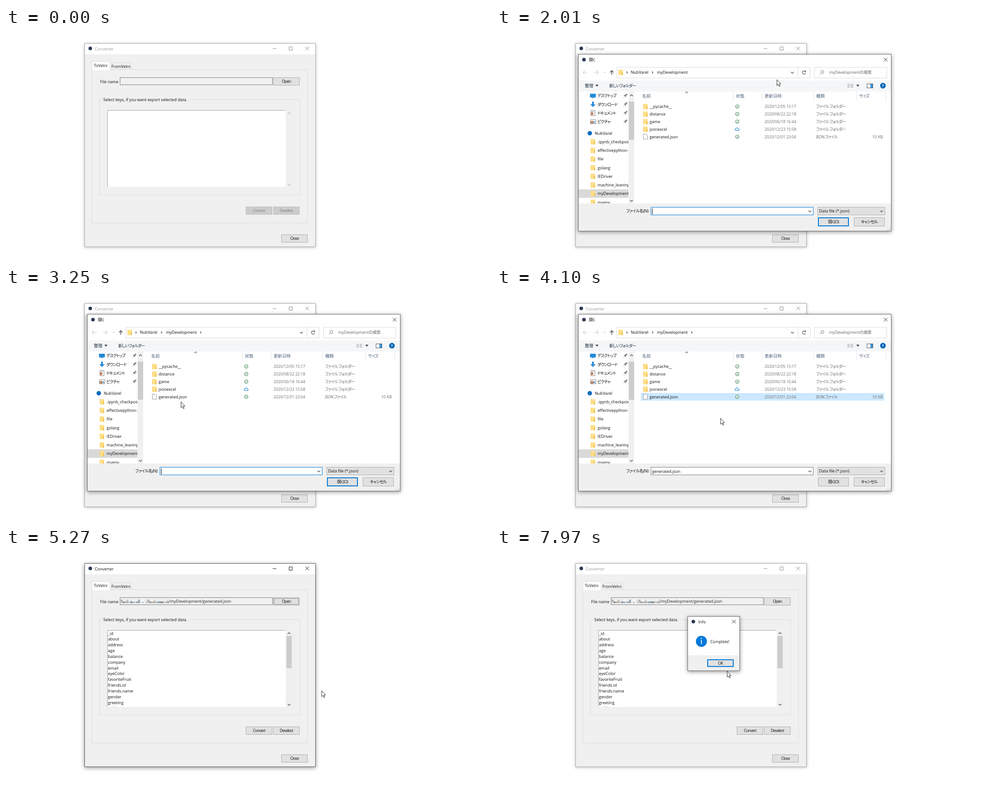
An HTML page that plays this animation: 1082x517 px, repeating every 8000 ms.

```html
<!DOCTYPE html>
<html lang="ja">
<head>
<meta charset="utf-8">
<title>Converter</title>
<style>
html, body { margin: 0; width: 100%; height: 100%; overflow: hidden; background: #fff; }
svg { display: block; width: 1082px; height: 517px; }
text { font-family: 'Open Sans', 'Noto Sans CJK JP', 'Noto Sans CJK', sans-serif; font-size: 9.06px; white-space: pre; }
.kana { font-feature-settings: 'palt'; letter-spacing: -.8px; }
.kanji { font-size: 9.5px; }
.wide { filter: drop-shadow(0 2px 5px rgba(0,0,0,.42)); }
.soft { filter: drop-shadow(0 1px 3px rgba(0,0,0,.28)); }
</style>
</head>
<body>
<svg id="stage" viewBox="0 0 1082 517" xmlns="http://www.w3.org/2000/svg"></svg>
<script>
const LOOP = 8000, BLUE = '#0078d7', NAVY = '#2b3a55';
const stage = document.getElementById('stage');
const $ = id => document.getElementById(id);

// Markup helpers
const fillRect = (x, y, w, h, fill, extra = '') =>
  `<rect x="${x}" y="${y}" width="${w}" height="${h}" fill="${fill}" ${extra}/>`;
const box = (x, y, w, h, fill, stroke, extra = '') =>
  fillRect(x + .5, y + .5, w - 1, h - 1, fill, `stroke="${stroke}" ${extra}`);
const line = (d, stroke, width = 1, extra = '') =>
  `<path d="${d}" fill="none" stroke="${stroke}" stroke-width="${width}" ${extra}/>`;
const dot = (x, y, r, fill) => `<circle cx="${x}" cy="${y}" r="${r}" fill="${fill}"/>`;
const label = (x, y, s, fill = '#111', extra = '') => `<text x="${x}" y="${y}" fill="${fill}" ${extra}>${s}</text>`;
const kana = (x, y, s, fill = '#111', extra = '') => label(x, y, s, fill, `class="kana" ${extra}`);
const kanji = (x, y, s, fill) => label(x, y, s, fill, 'class="kanji"');
const group = (id, body, extra = '') => `<g id="${id}" ${extra}>${body}</g>`;
const chevron = (x, y, turn, color, size = 3, width = 1.2) =>
  line(`M${-size} ${-size / 2}L0 ${size / 2}L${size} ${-size / 2}`, color, width, `transform="translate(${x} ${y}) rotate(${turn})"`);
const cross = (x, y, color) => line(`M${x - 4} ${y - 4}l8 8m0 -8l-8 8`, color);
const folder = (x, y) => fillRect(x, y - 6, 10, 12, '#ffe08a') + fillRect(x + 7, y - 1, 3, 7, '#f3c65a') + fillRect(x, y - 6, 1, 12, '#f6d274');
const page = (x, y) => `<path d="M${x + .5} ${y - 6}h6.5l2.5 2.5v9h-9z" fill="#fff" stroke="#8c8c8c" stroke-width=".9"/>`;
const down = (x, y) => `<path d="M${x - 3.5} ${y - 2}h7l-3.5 4z" fill="#333"/>`;

// Buttons
const LOOKS = {
  normal: ['#e1e1e1', '#adadad', 1, '#111'],
  hover: ['#e5f1fb', BLUE, 1, '#111'],
  press: ['#cce4f7', '#005499', 1, '#111'],
  pressFocus: ['#cce4f7', BLUE, 2, '#111'],
  primary: ['#e1e1e1', BLUE, 2, '#111'],
  off: ['#cccccc', '#bfbfbf', 1, '#838383']
};
const buttons = {};
function button(id, x, y, w, h, text, look = 'normal') {
  buttons[id] = { x, y, w, h };
  const [fill, stroke, width, ink] = LOOKS[look], half = width / 2;
  const face = fillRect(x + half, y + half, w - width, h - width, fill, `stroke="${stroke}" stroke-width="${width}"`);
  const ring = fillRect(x + 2.5, y + 2.5, w - 5, h - 5, 'none', 'class="ring" stroke="#333" stroke-width=".9" stroke-dasharray="1 1" visibility="hidden"');
  return group(id, face + ring + kana(x + w / 2, y + h / 2 + 3.3, text, ink, 'text-anchor="middle"'));
}
function setLook(id, look, focus = false) {
  const { x, y, w, h } = buttons[id], [fill, stroke, width, ink] = LOOKS[look];
  const [face, ring, text] = $(id).children;
  const attrs = { x: x + width / 2, y: y + width / 2, width: w - width, height: h - width, fill, stroke, 'stroke-width': width };
  for (const k in attrs) face.setAttribute(k, attrs[k]);
  ring.setAttribute('visibility', focus ? 'inherit' : 'hidden');
  text.setAttribute('fill', ink);
}

// Main window
const KEYS = '_id about address age balance company email eyeColor favoriteFruit friends.id friends.name gender greeting guid'.split(' ');

function mosaic() {
  let seed = 11, out = '';
  const rnd = () => (seed = seed * 16807 % 2147483647) / 2147483647;
  for (let i = 0; i < 25; i++) for (let j = 0; j < 2; j++) {
    const shade = (j ? 52 : 66) + rnd() * 32, tint = rnd() < .3 ? 35 : 5, hue = rnd() < .5 ? 40 : 205;
    if (rnd() < (j ? .9 : .5)) out += fillRect(256 + i * 4.28, 115 + j * 4, 4.3, 4, `hsl(${hue} ${tint}% ${shade}%)`);
  }
  return out;
}

function mainWindow() {
  const edge = '#dcdcdc';
  return box(175, 34, 516, 454, '#f0f0f0', '#aaa', 'id="frame"') +
    fillRect(176, 35, 514, 23.5, '#fff') + dot(188, 45.5, 4, NAVY) +
    label(198, 49.5, 'Converter', '#999', 'id="title"') +
    group('controls', '<path d="M595 46h8M631.5 42h7v7.500h-7zM668 41.500l8 8m0 -8l-8 8"/>', 'fill="none" stroke="#888"') +
    box(191, 92, 482, 343, '#f0f0f0', edge) +
    box(232, 77, 49, 16, '#f0f0f0', edge) + label(235, 88.5, 'FromVelni') +
    box(191, 74, 42, 20, '#fff', edge) + fillRect(192, 92, 40, 2, '#fff') + label(196, 87, 'ToVelni') +
    label(210, 122.5, 'File name') + box(254, 110, 341, 17, '#f0f0f0', '#7a7a7a') +
    group('path', mosaic() + label(363, 122.3, '/myDevelopment/generated.json', '#222')) +
    button('open', 596, 110, 59, 18, 'Open') +
    box(208, 159, 448, 213, 'none', edge) + fillRect(214, 158, 193, 3, '#f0f0f0') +
    label(217, 162.5, 'Select keys, if you want export selected data.') +
    fillRect(227, 183, 397, 171, '#fff') + line('M226.5 354V183.5H623', '#a0a0a0') +
    group('keys', KEYS.map((k, i) => label(227.5, 193.6 + i * 12.83, k)).join(''), 'clip-path="url(#listClip)"') +
    fillRect(625.5, 196, 12, 72, '#cdcdcd', 'id="thumb"') +
    group('listArrows', '<path d="M628.500 191.500l3 -3l3 3M628.500 347.500l3 3l3 -3"/>', 'fill="none" stroke="#bfbfbf" stroke-width="1.300"') +
    button('convert', 535, 398, 59, 18, 'Convert', 'off') + button('deselect', 596, 398, 59, 18, 'Deselect', 'off') +
    button('close', 614, 460, 59, 18, 'Close');
}

// File dialog
const ROW_TOP = 166.5, ROW_H = 16.85;
const FILES = [['__pycache__', '2020/12/05 15:17'], ['distance', '2020/08/22 22:18'], ['game', '2020/06/18 16:44'],
  ['jsonexcel', '2020/12/23 15:58'], ['generated.json', '2020/12/01 23:04']];
const TREE = ['.ipynb_checkpoints', 'effectivepython-main', 'file', 'golang', 'IEDriver', 'machine_leaning', 'myDevelopment', 'myenv'];

const cloud = (x, y) => `<path d="M${x - 3} ${y + 3}a2.300 2.300 0 0 1 0 -4.500a3 3 0 0 1 5.500 .7a2 2 0 0 1 .5 3.800z" fill="#fff" stroke="${BLUE}" stroke-width="1.100"/>`;
const tick = (x, y) => `<circle cx="${x}" cy="${y}" r="3.900" fill="#fff" stroke="#2c7a46"/>` + line(`M${x - 2} ${y}l1.500 1.600l2.600 -3`, '#2c7a46');

function fileRow([name, date], i) {
  const y = 175 + i * ROW_H, base = y + 3.3, isFile = i === 4, grey = '#6d6d6d';
  return (isFile ? page : folder)(326, y) + label(340.5, base, name) + (i === 3 ? cloud : tick)(536, y) +
    label(597, base, date, grey, 'style="font-size:8.7px"') +
    kana(712, base, isFile ? 'JSON ファイル' : 'ファイル フォルダー', grey) +
    (isFile ? label(861, base, '10 KB', grey, 'text-anchor="end"') : '');
}

function sidebar() {
  const quick = ['デスクトップ', 'ダウンロード', 'ドキュメント', 'ピクチャ'];
  const pic = [
    fillRect(207.5, 146.5, 13, 8, '#1e88d8') + fillRect(211, 155, 6, 1, '#1e6aa8'),
    '<path d="M212 164h4v6h4l-6 6l-6 -6h4z" fill="#2a8ad8"/>',
    box(209, 183, 10, 13, '#fff', '#888') + line('M211 186.500h5', '#777') + dot(212, 191, 3, '#c77b52'),
    box(208, 204, 13, 10, '#fff', '#888') + fillRect(214, 208, 5, 4, '#69a8d8') + dot(212, 210, 3, '#c77b52')
  ];
  let out = fillRect(182, 359.5, 111, 19, '#d9d9d9');
  quick.forEach((s, i) => {
    const y = 151 + i * 19.25;
    out += pic[i] + kana(224, y + 3.3, s) +
      `<path d="M284 ${y + 3}l-2 2M283 ${y - 1}l4 4l1 -3l3 -3l-2 -2l-3 3z" fill="#888" stroke="#888" stroke-width=".7"/>`;
  });
  out += dot(207, 234.5, 5, '#0f6cbd') + label(218, 237.5, 'NubVarel');
  TREE.forEach((s, i) => { const y = 253.5 + i * 19.25; out += folder(209, y) + label(224.5, y + 3.3, s); });
  return `<g clip-path="url(#treeClip)">${out}</g>` + fillRect(293.5, 142, 12.5, 249, '#f0f0f0') +
    fillRect(294, 164, 12, 85, '#cdcdcd') + chevron(300, 150, 180, '#444') + chevron(300, 385, 0, '#444');
}

function fileDialog() {
  const head = '#4c607a', pale = '#d9d9d9';
  const columns = [[324, '名前'], [533, '状態'], [597, '更新日時'], [712, '種類']];
  return box(181, 58, 699, 395, '#fff', '#666', 'class="wide"') +
    fillRect(182, 117, 697, 24.5, '#f4f6f7') + fillRect(182, 391, 697, 61, '#f0f0f0') +
    group('dialogMarks', dot(194, 70.5, 4, NAVY) + cross(867, 70.5, '#222')) +
    kana(205, 74, '開く', '#111', 'id="dialogTitle"') +
    line('M202 99h-10m4 -4l-4 4l4 4M216 99h10m-4 -4l4 4l-4 4', '#ccc', 1.1) + chevron(240, 99, 0, '#ccc', 2) +
    line('M256 104v-9m-4 4l4 -4l4 4', '#444', 1.4) +
    box(267, 87, 432, 25, '#fff', pale) + line('M671.500 88v23', pale) + folder(271, 99) +
    chevron(290, 99, -90, '#444', 2.2) + label(298.5, 102.3, 'NubVarel') + chevron(347, 99, -90, '#444', 2.2) +
    label(357, 102.3, 'myDevelopment', '#111', 'style="font-size:8.95px"') +
    group('crumb', chevron(434.5, 99, -90, '#444', 2.2)) +
    chevron(659, 99.5, 0, '#444') + line('M688 97a3.700 3.700 0 1 0 .5 3.500M688.500 94.500v3h-3', '#444', 1.1) +
    box(708, 87, 162, 25, '#fff', pale) + '<circle cx="726" cy="98" r="3.200" fill="none" stroke="#777"/>' + line('M723.500 100.500l-3 3', '#777') +
    kana(741, 102.3, 'myDevelopmentの検索', '#666', 'style="letter-spacing:-.1px"') +
    kanji(196, 132, '整理', '#1a2a40') + down(223, 128.5) + kana(250.5, 132, '新しいフォルダー', '#1a2a40') +
    line('M782 125.500h5m2 0h6M782 128.500h5m2 0h6M782 131.500h5m2 0h6', '#777', 1.2, 'stroke-dasharray="2.500 .6"') + down(805, 128.5) +
    box(825, 124, 14, 10, '#fff', '#555') + fillRect(833, 125, 5, 8, '#3a96dd') +
    dot(861, 128.5, 6.3, '#0067b8') + label(861, 132, '?', '#fff', 'text-anchor="middle" font-weight="700"') +
    sidebar() + chevron(423, 143.5, 180, '#666') +
    columns.map(([x, s]) => kanji(x, 155, s, head)).join('') + kana(808, 155, 'サイズ', head) +
    line('M527.500 142v21M591.500 142v21M706.500 142v21M802.500 142v21M867.500 142v21', '#e5e5e5') +
    fillRect(321, 0, 543, 17, '#e5f3ff', 'id="hoverRow"') + fillRect(321, 234, 543, 17, '#cce8ff', 'id="pickedRow"') +
    FILES.map(fileRow).join('') +
    kana(339, 411.3, 'ファイル名(N):', '#111', 'text-anchor="end" style="letter-spacing:-.5px"') +
    box(343, 399, 363, 18, '#fff', BLUE, 'id="nameBox"') + chevron(698, 408.5, 0, '#444') +
    fillRect(345.5, 402, 64, 13, BLUE, 'id="nameMark"') + label(346, 411.6, 'generated.json', '#111', 'id="nameText"') +
    fillRect(346, 402, 1, 13, '#000', 'id="caret"') +
    button('combo', 715, 399, 151, 18, '') + label(718.5, 411.3, 'Data file (*.json)') + chevron(858, 408.5, 0, '#444') +
    button('pick', 716, 422, 69, 20, '開く(O)', 'primary') + button('cancel', 796, 422, 69, 20, 'キャンセル') +
    [[877, 446], [874, 449], [877, 449], [871, 449]].map(([x, y]) => fillRect(x - 1, y, 1.5, 1.5, '#aaa')).join('');
}

function infoDialog() {
  return box(425, 152, 117, 122, '#fff', '#666', 'class="wide"') + fillRect(426, 239, 115, 34, '#f0f0f0') +
    dot(438, 164, 4, NAVY) + label(449, 167.8, 'Info') + cross(528.5, 164, '#222') +
    dot(456, 208, 12.3, BLUE) + fillRect(455, 205, 1.8, 9, '#fff') + dot(455.9, 201.8, 1.3, '#fff') +
    label(476, 211.8, 'Complete!', '#111', 'style="font-size:8.9px"') + button('ok', 469, 248, 59, 17, 'OK', 'primary');
}

stage.innerHTML = `<defs><clipPath id="listClip"><rect x="227" y="184" width="397" height="170"/></clipPath>
  <clipPath id="treeClip"><rect x="182" y="142" width="111" height="249"/></clipPath></defs>` +
  fillRect(0, 0, 1082, 517, '#fff') + mainWindow() + group('dialog', fileDialog()) + group('info', infoDialog()) +
  '<circle id="click" r="10.500" fill="#e6e63c" fill-opacity=".8"/>' +
  group('cursor', '<path d="M.5 .5V13.700L3.400 11L5.500 15.800L7.600 14.900L5.500 10.200H9.200Z" fill="#fff" stroke="#111" stroke-width=".9"/>');

// Pointer moves: start, end, steps, x, y
const MOVES = [
  [70, 450, 6, 712, 218], [700, 700, 1, 725, 242], [777, 1230, 7, 624, 114.5],
  [2390, 3180, 11, 388, 247], [3250, 3250, 1, 390, 253], [3310, 3310, 1, 392, 239],
  [3870, 4490, 9, 802, 435], [4570, 4570, 1, 775, 431], [4640, 4640, 1, 760, 431.5],
  [5100, 5580, 7, 617, 142], [5650, 6420, 11, 569, 387], [6500, 6650, 3, 569, 405],
  [7570, 7970, 6, 513, 274]
];
const CLICKS = [[1460, 1610], [3710, 3790], [4790, 4870], [6890, 6967]];
const clamp = v => Math.max(0, Math.min(1, v));
const ease = u => u * u * (3 - 2 * u);
const within = (t, a, b) => t >= a && t < b;

function pointer(t) {
  let x = 970, y = 500;
  for (const [a, b, n, nx, ny] of MOVES) {
    if (t < a) break;
    const step = n > 1 ? Math.min(n, Math.floor((t - a) / (b - a) * (n - 1) + 1e-6) + 1) : 1;
    const u = ease(step / n);
    x += (nx - x) * u;
    y += (ny - y) * u;
  }
  return [x, y];
}

function show(id, on) { $(id).style.display = on ? '' : 'none'; }
function fade(id, amount, cx, cy) {
  const s = .93 + .07 * amount;
  show(id, amount > 0);
  $(id).setAttribute('opacity', amount);
  $(id).setAttribute('transform', `translate(${cx * (1 - s)} ${cy * (1 - s)}) scale(${s})`);
}

function draw(t) {
  const [x, y] = pointer(t);
  const over = id => { const b = buttons[id]; return x >= b.x && x < b.x + b.w && y >= b.y && y < b.y + b.h; };
  const hoverLook = (id, base = 'normal') => over(id) ? 'hover' : base;
  const active = within(t, 1460, 1610) || within(t, 4870, 7045);
  const loaded = t >= 5040, picked = t >= 3710, closing = t >= 4870;

  const frame = $('frame');
  frame.setAttribute('class', active ? 'wide' : 'soft');
  frame.setAttribute('stroke', active ? '#555' : '#aaa');
  $('title').setAttribute('fill', active ? '#111' : '#999');
  $('controls').setAttribute('stroke', active ? '#111' : '#888');
  $('listArrows').setAttribute('stroke', loaded ? '#505050' : '#bfbfbf');
  ['path', 'keys', 'thumb'].forEach(id => show(id, loaded));

  const opening = within(t, 1460, 1610);
  setLook('open', opening ? 'pressFocus' : t < 1460 ? hoverLook('open') : 'normal', opening || within(t, 4870, 6890));
  const pressing = within(t, 6890, 7045);
  setLook('convert', !loaded ? 'off' : pressing ? 'press' : t < 6890 ? hoverLook('convert') : 'normal', pressing);
  setLook('deselect', loaded ? 'normal' : 'off');

  fade('dialog', t < 1780 ? 0 : t < 4960 ? clamp((t - 1700) / 220) : clamp((5130 - t) / 220), 530, 256);
  show('crumb', t >= 2160);
  show('dialogMarks', !closing);
  $('dialogTitle').setAttribute('x', closing ? 188.5 : 205);
  const row = Math.floor((y - ROW_TOP) / ROW_H);
  show('hoverRow', x >= 321 && x < 864 && row >= 0 && row < 5);
  $('hoverRow').setAttribute('y', ROW_TOP + row * ROW_H);
  show('pickedRow', picked);
  $('pickedRow').setAttribute('fill', t >= 4790 ? '#d9d9d9' : '#cce8ff');
  $('nameBox').setAttribute('stroke', picked ? '#7a7a7a' : BLUE);
  show('nameText', picked);
  show('nameMark', t >= 4790);
  $('nameText').setAttribute('fill', t >= 4790 ? '#fff' : '#111');
  show('caret', !picked && Math.floor((t + 220) / 530) % 2 === 0);
  setLook('combo', hoverLook('combo'));
  setLook('cancel', hoverLook('cancel'));
  setLook('pick', t >= 4790 ? 'press' : hoverLook('pick', picked ? 'normal' : 'primary'));

  fade('info', t < 7120 ? 0 : clamp((t - 7050) / 230), 483, 213);

  show('cursor', t >= 70);
  $('cursor').setAttribute('transform', `translate(${x} ${y})`);
  show('click', CLICKS.some(([a, b]) => within(t, a, b)));
  $('click').setAttribute('cx', x);
  $('click').setAttribute('cy', y + 2);
}

function tick60() {
  draw(performance.now() % LOOP);
  requestAnimationFrame(tick60);
}
tick60();
</script>
</body>
</html>
```
